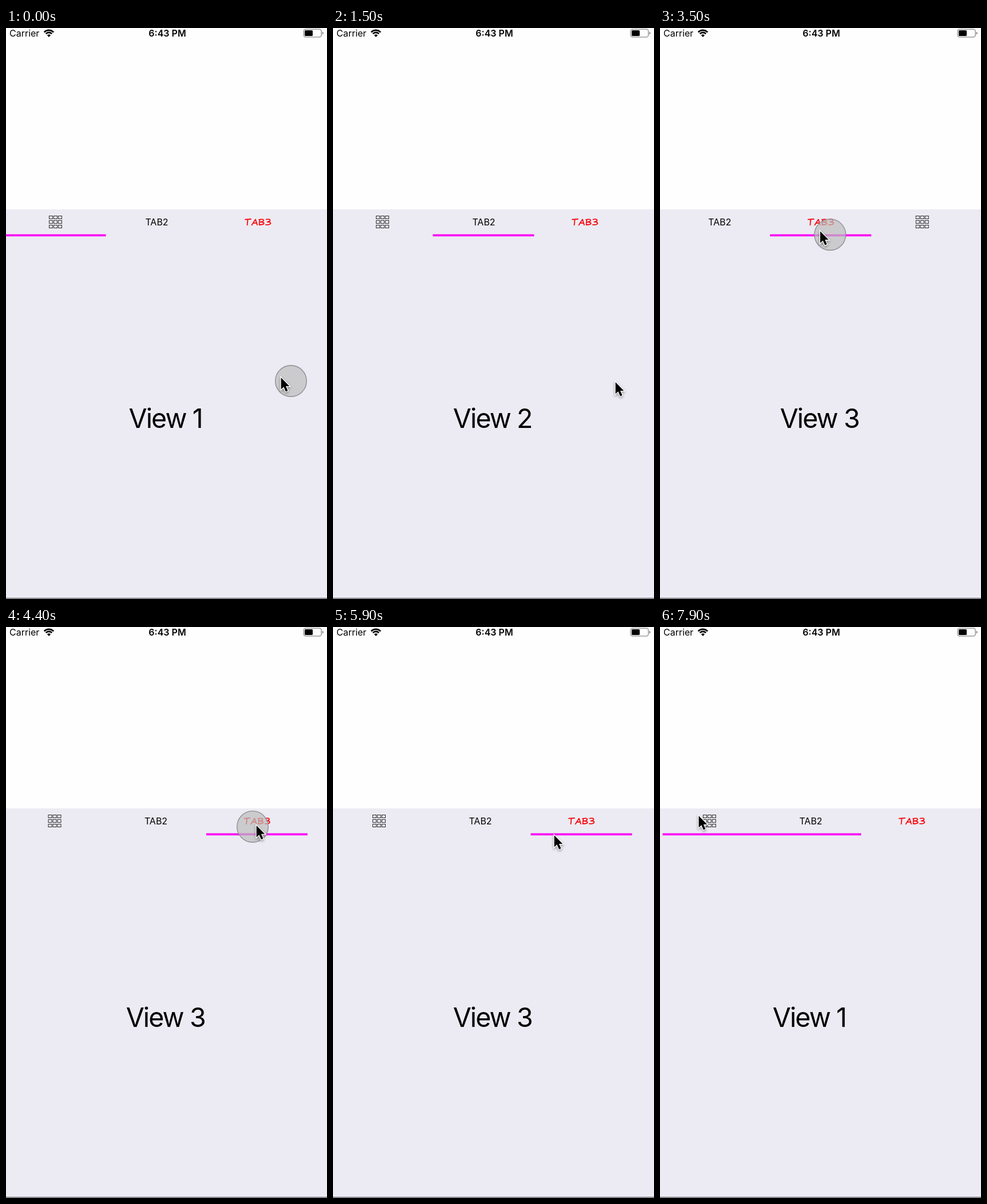
Animation, 561 px wide and 998 px high, one loop 8000 ms. Source, as an HTML page with a canvas:

```html
<!DOCTYPE html>
<html lang="en">
<head>
<meta charset="utf-8">
<title>Tabbed pager</title>
<style>
html, body { margin: 0; width: 100%; height: 100%; overflow: hidden; background: #fffeff; }
canvas { display: block; width: 561px; height: 998px; }
</style>
</head>
<body>
<canvas id="stage" width="561" height="998" aria-label="Pager with TAB2 and TAB3"></canvas>
<script>
const ctx = document.getElementById('stage').getContext('2d');
const W = 561, H = 998, LOOP = 8000, STEP = 100;
const TAB_W = 177, TAB_LOOP = 3 * TAB_W, TAB_X = 86, MID = 279.5;
const FONT = 'Inter, Roboto, sans-serif';

const clamp = v => Math.max(0, Math.min(1, v));
const lerp = (a, b, u) => a + (b - a) * u;
const smooth = (t, from, ms) => { const u = clamp((t - from) / ms); return u * u * (3 - 2 * u); };

// Eased pointer moves; a drag keeps the finger down
const leg = (t0, ms, x, y, drag) => ({ t0, ms, x, y, drag });
const LEGS = [
  leg(0, 700, 62, 590, true),
  leg(850, 500, 494, 620),
  leg(2210, 190, 44, 560, true),
  leg(2700, 400, 439.5, 355),
  leg(3200, 700, 35, 358, true),
  leg(3900, 694, 533, 345.6, true),
  leg(4650, 450, 68, 356, true),
  leg(5100, 442, 387, 365, true),
  leg(5900, 550, 273, 335),
  leg(6900, 300, 68, 331)
];

function pointerAt(t) {
  let x = 481, y = 612, touch = null;
  for (const l of LEGS) {
    if (t < l.t0) break;
    const u = smooth(t, l.t0, l.ms);
    // the dot trails the arrow more on leftward drags
    if (l.drag && t < l.t0 + l.ms) touch = l.x < x ? [17, 5] : [-7, 1];
    x = lerp(x, l.x, u);
    y = lerp(y, l.y, u);
  }
  if (MOVES.some(m => m.tap && t >= m.t0 - 120 && t < m.t0)) touch = [0, 0];
  return { x, y, touch };
}

// The page follows the finger, then glides the rest of the way
function swipe(a, b, t0, ms, reach) {
  const up = t0 + ms;
  const at = t => t < up ? smooth(t, t0, ms) * reach / W
    : 1 - (1 - reach / W) * Math.exp((up - t) / 100);
  return { a, b, t0, t1: up + 400, bend: 1, at };
}

const tap = (a, b, t0) => ({ a, b, t0, t1: t0 + 300, bend: 1.25, tap: true, at: t => smooth(t, t0, 300) });

const MOVES = [
  swipe(0, 1, 0, 700, 419), swipe(1, 2, 2210, 190, 450),
  tap(2, 1, 6602), tap(1, 0, 7632)
];

// The bar's leading edge moves with the page, the other edge catches up later
function pager(t) {
  const m = MOVES.filter(m => t >= m.t0).pop();
  const p = t < m.t1 ? m.at(t) : 1;
  const lead = lerp(m.a, m.b, Math.pow(p, m.bend));
  const trail = lerp(m.a, m.b, smooth(t, m.t1, 150));
  return { page: lerp(m.a, m.b, p), from: Math.min(lead, trail), to: Math.max(lead, trail) + 1 };
}

function tabScroll(t, x) {
  if (t < 3200) return 0;
  if (t < 5900) return x - lerp(439.5, 393, smooth(t, 4550, 150));
  return -6 * (1 - smooth(t, 6700, 150));
}

function text(str, x, y, size, align = 'center', weight = 400, spacing = 0) {
  ctx.font = `${weight} ${size}px ${FONT}`;
  ctx.letterSpacing = spacing + 'px';
  ctx.textAlign = align;
  ctx.fillStyle = '#000';
  ctx.fillText(str, x, y);
}

function rect(x, y, w, h, color) {
  ctx.fillStyle = color;
  ctx.fillRect(x, y, w, h);
}

function statusBar() {
  text('Carrier', 6, 15, 16, 'left');
  text('6:43 PM', 282, 15, 16, 'center', 600);

  ctx.strokeStyle = '#000';
  ctx.lineWidth = 2.6;
  for (const r of [7.3, 11.3]) {
    ctx.beginPath();
    ctx.arc(75, 15.2, r, -Math.PI * 0.76, -Math.PI * 0.24);
    ctx.stroke();
  }
  ctx.fillStyle = '#000';
  ctx.beginPath();
  ctx.moveTo(75, 16);
  ctx.arc(75, 15.6, 4.4, -Math.PI * 0.76, -Math.PI * 0.24);
  ctx.fill();

  ctx.strokeStyle = '#8a8a8c';
  ctx.lineWidth = 1.3;
  ctx.beginPath();
  ctx.roundRect(520.2, 2.2, 31, 13.6, 3.6);
  ctx.stroke();
  ctx.fillStyle = '#000';
  ctx.beginPath();
  ctx.roundRect(522, 4, 14, 10, 1.6);
  ctx.fill();
  ctx.fillStyle = '#8a8a8c';
  ctx.beginPath();
  ctx.arc(552.6, 9, 2.2, -Math.PI / 2, Math.PI / 2);
  ctx.fill();
}

function gridIcon(x) {
  ctx.strokeStyle = '#2c2c2e';
  ctx.lineWidth = 1;
  for (let i = 0; i < 9; i++) {
    ctx.strokeRect(x - 10.5 + (i % 3) * 8, 328.5 + Math.floor(i / 3) * 8, 6, 5);
  }
}

// Marker-style lettering of TAB3, centred on zero
const MARKER = new Path2D(
  'M-22 -4.6 L-12 -5.2 M-17.4 -4.8 L-18.4 5.2 ' +
  'M-10.4 5.2 L-4 -4.6 L-1 5 M-8.4 1.8 L-1.8 1.4 ' +
  'M3.4 -4.2 L2.6 4.8 M2.2 -4.2 Q9.8 -6 10.2 -3 Q10 -.6 4 0 Q11.4 .2 10.8 2.6 Q9.6 4.8 2.6 4.8 ' +
  'M14.6 -4.6 Q21.8 -5.8 21.6 -3.2 Q21 -.8 16.6 -.4 Q23 -.2 22.4 2.4 Q21 5.2 14 4.6');

function markerTab(x) {
  ctx.save();
  ctx.translate(x, 339.2);
  ctx.strokeStyle = '#f80a10';
  ctx.lineWidth = 1.8;
  ctx.lineCap = ctx.lineJoin = 'round';
  ctx.stroke(MARKER);
  ctx.restore();
}

const TABS = [gridIcon, x => text('TAB2', x + 0.5, 345, 16), markerTab];

function tabs(scroll, from, to) {
  TABS.forEach((tab, i) => {
    for (let k = -1; k <= 1; k++) tab(TAB_X + i * TAB_W + scroll + k * TAB_LOOP);
  });
  const left = TAB_X - TAB_W / 2 + scroll;
  rect(left + from * TAB_W, 360.5, (to - from) * TAB_W, 3.7, '#fa05f5');
}

function dot(x, y) {
  ctx.beginPath();
  ctx.arc(x, y, 27.3, 0, 2 * Math.PI);
  ctx.fillStyle = 'rgba(190,190,190,.7)';
  ctx.fill();
  ctx.strokeStyle = '#8f8e92';
  ctx.lineWidth = 1.4;
  ctx.stroke();
}

const ARROW = new Path2D('M0 0 V20.5 L4.7 16.2 L8.3 24.4 L11.8 22.9 L8.3 14.9 H14.6 Z');

function arrow(x, y) {
  ctx.save();
  ctx.translate(x - 0.3, y - 1);
  ctx.lineWidth = 2.6;
  ctx.strokeStyle = '#fff';
  ctx.shadowColor = 'rgba(0,0,0,.4)';
  ctx.shadowBlur = 4;
  ctx.shadowOffsetY = 2;
  ctx.stroke(ARROW);
  ctx.shadowColor = 'transparent';
  ctx.fillStyle = '#000';
  ctx.fill(ARROW);
  ctx.restore();
}

function draw(t) {
  const { page, from, to } = pager(t);
  const { x, y, touch } = pointerAt(t);
  rect(0, 0, W, H, '#fffeff');
  rect(0, 317, W, H - 317, '#ecebf3');
  rect(0, 996, W, 1.4, '#59595c');
  statusBar();
  for (let i = 0; i < 3; i++) {
    text('View ' + (i + 1), MID - 0.8 + (i - page) * W, 698.5, 46.5, 'center', 400, -1.9);
  }
  tabs(tabScroll(t, x), from, to);
  if (touch) dot(x + touch[0], y + touch[1]);
  arrow(x, y);
}

const start = performance.now();
function tick() {
  const t = (performance.now() - start) % LOOP;
  draw(Math.floor(t / STEP) * STEP);
  requestAnimationFrame(tick);
}
tick();
</script>
</body>
</html>
```
